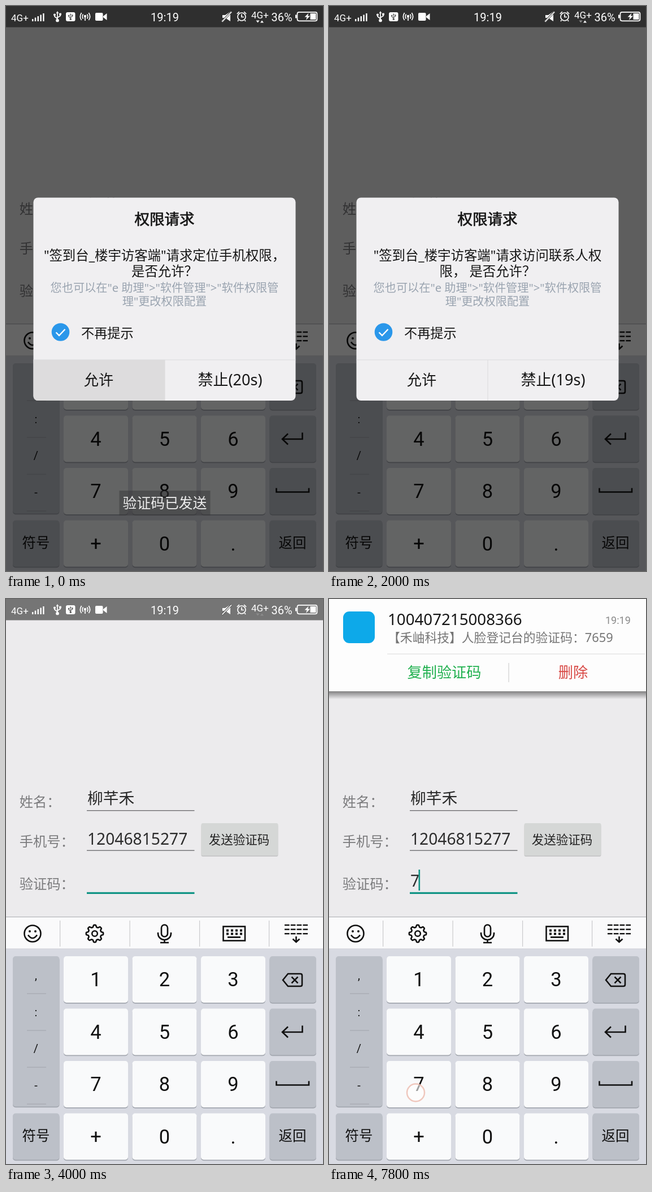
These frames come from a looping animation (561 by 998 pixels, 8000 ms). An HTML page:

```html
<!DOCTYPE html>
<html lang="zh-CN">
<head>
<meta charset="utf-8">
<title>验证码登记</title>
<style>
html, body { margin: 0; width: 100%; height: 100%; overflow: hidden; background: #ecebed; }
svg { display: block; width: 100%; height: 100%; }
text { font-family: "Noto Sans", "Noto Sans CJK SC", "Noto Sans CJK", sans-serif; white-space: pre; }
.ui { font-family: Roboto, "Noto Sans", sans-serif; }
.line { fill: none; stroke: #111; stroke-width: 2.6; }
.white { fill: none; stroke: #fff; stroke-width: 1.7; }
</style>
</head>
<body>
<svg id="stage" viewBox="0 0 561 998" preserveAspectRatio="none"></svg>
<script>
const LOOP = 8000, STEP = 200;
const stage = document.getElementById('stage');

const rect = (x, y, w, h, fill, extra = '') =>
  `<rect x="${x}" y="${y}" width="${w}" height="${h}" fill="${fill}" ${extra}/>`;
const text = (x, y, size, fill, str, extra = '') =>
  `<text x="${x}" y="${y}" font-size="${size}" fill="${fill}" ${extra}>${str}</text>`;
const mid = (x, y, size, fill, str, extra = '') =>
  text(x, y, size, fill, str, `text-anchor="middle" ${extra}`);
const path = (d, cls = 'line', extra = '') => `<path d="${d}" class="${cls}" ${extra}/>`;
const range = n => [...Array(n).keys()];
const UI = 'class="ui"';

function usb(x, y, s, color) {
  return `<g transform="translate(${x} ${y}) scale(${s})" fill="${color}" stroke="${color}" stroke-width="1.7">
    <path d="M0-7V7M0 4L-5 0V-3M0 2L5-1V-4" fill="none"/>
    <path d="M0-9.5l2.4 4h-4.8z" stroke="none"/><circle cy="7" r="2"/>
    <circle cx="-5" cy="-3" r="1.2"/><rect x="4" y="-5" width="2" height="2"/></g>`;
}

function statusIcons() {
  const cut = '#5a5a5a';
  const bars = range(5).map(i => rect(46 + i * 4.8, 23 - i * 2.5, 2.4, 4 + i * 2.5, '#fff')).join('');
  return text(9, 27, 17, '#fff', '4G+', UI) + bars +
    usb(91, 18.5, 1, '#fff') +
    rect(106, 11, 16.5, 16, '#fff', 'rx="3"') + usb(114.3, 19, .62, cut) +
    `<circle cx="140" cy="18" r="2.2" fill="#fff"/>` +
    path('M136.5 14.5q-2.6 4 0 8M143.5 14.5q2.6 4 0 8M133.6 12q-4.4 7 0 13M146.4 12q4.4 7 0 13M140 19v7', 'white') +
    rect(158, 12, 13.5, 14, '#fff', 'rx="2"') +
    path('M172 18l6.5-5v12l-6.5-5z', '', 'fill="#fff"') +
    mid(281, 26.5, 20, '#fff', '19:19', UI) +
    path('M383 16h5l9-6v17l-9-6h-5z', '', 'fill="#fff"') +
    path('M382 28L399 10', '', `stroke="${cut}" stroke-width="4"`) +
    path('M382.5 27.5L399 10.5', 'white') +
    `<circle cx="417" cy="19" r="7" class="white"/>` +
    path('M417 14.5v5h4M408.8 14l4-3.8M425.2 14l-4-3.8M411.5 25l-1.5 2M422.5 25l1.5 2', 'white') +
    text(434, 22, 17, '#fff', '4G+', UI) +
    `<path id="down" d="M442.5 25.5h6l-3 4z"/><path id="up" d="M450 29.5h6l-3-4z"/>` +
    text(469.5, 26.5, 20, '#fff', '36%', UI) +
    rect(515.5, 10.8, 35, 15.5, 'none', 'rx="3" class="white"') +
    rect(512, 15.5, 2.5, 6, '#fff') + rect(538.5, 13, 10, 11, '#fff') +
    path('M535.5 12.5l-7 7h4l-1.5 5.5 7-7.5h-4z', '', 'fill="#fff"');
}

function form() {
  const label = (y, s) => text(23.7, y, 24.3, '#7b7b7d', s);
  const underline = y => rect(143, y, 190.5, 1.4, '#6f6f72');
  return label(366.5, '姓名：') + label(437, '手机号：') + label(512, '验证码：') +
    text(144, 362, 27.8, '#282828', '柳芊禾') + underline(373) +
    text(144, 434, 28.2, '#2c2c2c', '12046815277') + underline(443.5) +
    rect(345.5, 398, 136, 57, '#b9babb', 'rx="3" opacity=".7"') +
    rect(345.5, 396, 136, 57, '#d5d7d6', 'rx="3"') +
    mid(412.5, 433, 21.5, '#222', '发送验证码') +
    rect(143, 517.8, 190.5, 3.2, '#119485') +
    text(144, 508, 28.2, '#2c2c2c', '7', 'id="code"') +
    rect(145, 478, 2.6, 37, '#119485', 'id="caret"');
}

function toolbar() {
  const gear = range(97).map(i => {
    const a = i / 96 * Math.PI * 2, r = 13.4 + 1.8 * Math.tanh(2.4 * Math.cos(8 * a));
    return `${(157 + r * Math.cos(a)).toFixed(1)} ${(591 + r * Math.sin(a)).toFixed(1)}`;
  }).join('L');
  const keys = range(8).map(i =>
    rect(390 + i % 4 * 8, 583.5 + (i >> 2) * 6, 4, 4, '#111')).join('');
  const dashes = range(12).map(i =>
    rect(493 + i % 4 * 10.8, 574.8 + (i >> 2) * 7.6, 8.6, 2.4, '#111')).join('');
  return rect(0, 561, 561, 58, '#fafafb') + rect(0, 561, 561, 1.2, '#b4b5b9') +
    rect(0, 617.5, 561, 1.2, '#c6c8cf') +
    [95, 218.5, 342, 465].map(x => rect(x, 568, 1.2, 46, '#c9c9cc')).join('') +
    `<circle cx="47" cy="591" r="14.5" class="line"/>
     <circle cx="42" cy="587" r="2" fill="#111"/><circle cx="52" cy="587" r="2" fill="#111"/>` +
    path('M39 593.5q8 11 16 0') + path(`M${gear}Z`) +
    `<circle cx="157" cy="591" r="4.8" class="line"/>` +
    rect(275, 575.5, 11, 21, 'none', 'rx="5.5" class="line"') +
    path('M269 589v2a11.5 11 0 0 0 23 0v-2M280.5 602v5M273 607h15') +
    rect(384.5, 578.5, 38.5, 25, 'none', 'class="line"') + keys +
    rect(392, 596, 23, 2.8, '#111') + dashes +
    path('M513.5 596v10M507.5 600.5l6 5.5 6-5.5');
}

function keypad() {
  const cols = [102, 223.5, 345], rows = [631, 723.5, 816, 908.5];
  const key = (x, y, w, h, fill) =>
    rect(x, y + 1.8, w, h, '#a3a7af', 'rx="5"') + rect(x, y, w, h, fill, 'rx="5"');
  const gray = (x, y, h = 82) => key(x, y, 82.5, h, '#bcc0c8');
  const digits = [...'123456789+0.'].map((c, i) => {
    const x = cols[i % 3], y = rows[Math.floor(i / 3)];
    return key(x, y, 114, 82, '#f9fafb') + mid(x + 57, y + 53.3, 34.5, '#111', c, UI);
  }).join('');
  const marks = [...',:/-'].map((c, i) =>
    mid(53, 672 + i * 64.5, 20, '#111', c, UI) +
    rect(37, 696.5 + i * 65, 34, 1.2, '#a5a9b1')).join('');
  return rect(0, 618.5, 561, 380, '#d8dae2') + digits +
    gray(12, 631, 265.5) + marks + rows.map(y => gray(466.5, y)).join('') + gray(12, 908.5) +
    mid(53, 957, 24.5, '#111', '符号') + mid(507, 957, 24.5, '#111', '返回') +
    path('M490 673l9-11h22q3 0 3 3v16q0 3-3 3h-22zM505.5 667.5l11 11M516.5 667.5l-11 11') +
    path('M524.5 753.5v11.5h-35M499 755.5l-10 9.5 10 9.5') +
    path('M478.5 851.500v7h57.500v-7');
}

function dialog() {
  const c = 280.5, ink = '#161616', hint = '#9aa4b0';
  return rect(48.5, 338.5, 464, 358.5, '#f0eff1', 'rx="8"') +
    `<path id="press" d="M48.5 625H281V697H56.5a8 8 0 0 1-8-8z" fill="#dddcdd"/>` +
    rect(48.5, 624.5, 464, 1, '#dcdcde') + rect(280.5, 625, 1, 72, '#dcdcde') +
    mid(c, 385.5, 26.5, ink, '权限请求', `stroke="${ink}" stroke-width=".7"`) +
    mid(c, 449, 23.4, ink, '', 'id="ask1"') + mid(c, 477, 23.4, ink, '', 'id="ask2"') +
    mid(c, 504.5, 20.2, hint, '您也可以在"e 助理">"软件管理">"软件权限管') +
    mid(c, 528.5, 20.2, hint, '理"更改权限配置') +
    `<circle cx="96.5" cy="576" r="15.8" fill="#2a97ea"/>` +
    path('M88.5 576.5l5.5 5.5 10.5-11', 'white', 'style="stroke-width:2.4"') +
    text(133, 585.5, 23.2, ink, '不再提示') +
    mid(164, 670, 26.2, ink, '允许') + mid(396.5, 670, 27, ink, '', 'id="deny"');
}

function notice() {
  return `<linearGradient id="shade" x2="0" y2="1"><stop stop-opacity=".45"/>
      <stop offset="1" stop-opacity="0"/></linearGradient>` +
    rect(0, 163, 561, 14, 'url(#shade)') +
    rect(0, -40, 561, 203, '#fdfdfd') +
    rect(25, 22, 56, 56, '#0da9e9', 'rx="11"') +
    text(104, 45.5, 27.7, '#161616', '100407215008366') +
    text(489, 44, 18, '#8a8a8a', '19:19', UI) +
    text(104, 75.5, 21.8, '#757575', '【禾岫科技】人脸登记台的验证码：7659') +
    rect(103, 96.5, 456, 1.2, '#e2e2e2') + rect(317.5, 113, 1.2, 34, '#cfcfcf') +
    mid(204, 139, 26.2, '#22b150', '复制验证码') + mid(432, 139, 26.2, '#d84a46', '删除');
}

stage.innerHTML = rect(0, 0, 561, 998, '#ecebed') + rect(0, 0, 561, 37.5, '#757575') +
  form() + toolbar() + keypad() +
  rect(0, 0, 561, 998, '#000', 'id="dim"') + statusIcons() +
  `<g id="dialog">${dialog()}</g>
   <g id="toast">${rect(200.5, 856, 161, 44, '#38383a', 'opacity=".5"')}${mid(281, 887, 24.8, '#ececec', '验证码已发送')}</g>
   <g id="notice">${notice()}</g>
   <circle id="touch" cx="153.5" cy="872" r="15.5" fill="#fff" fill-opacity=".6" stroke="#eebfb3" stroke-opacity=".85" stroke-width="2.5"/>`;

const el = {};
stage.querySelectorAll('[id]').forEach(n => el[n.id] = n);
const set = (id, name, value) => el[id].setAttribute(name, value);
const show = (id, on) => set(id, 'opacity', Number(on));
const clamp = v => Math.max(0, Math.min(1, v));

// Dialog state: [opacity, scale, dim]
function dialogState(t) {
  if (t < 200) return [1, 1, .6];
  if (t < 400) return [.5, 1, .3];
  if (t < 1000) return [0, 1, 0];
  if (t < 1200) return [.54, .866, .05];
  if (t < 2200) return [1, 1, .6];
  if (t < 2400) return [.5, 1, .3];
  return [0, 1, 0];
}

function render(now) {
  const t = Math.floor(now % LOOP / STEP) * STEP;
  const [alpha, scale, dim] = dialogState(t);
  const first = t < 1000;
  show('dialog', alpha);
  show('dim', dim);
  set('dialog', 'transform', `translate(281 517.5) scale(${scale}) translate(-281 -517.5)`);
  show('press', t < 400 || t >= 2200);
  el.ask1.textContent = '"签到台_楼宇访客端"' + (first ? '请求定位手机权限，' : '请求访问联系人权');
  el.ask2.textContent = first ? '是否允许？' : '限， 是否允许？';
  el.deny.textContent = `禁止(${t >= 2000 ? 19 : 20}s)`;
  show('toast', clamp((800 - t) / 400));

  set('down', 'fill', t < 200 ? '#fff' : '#8c8c8c');
  set('up', 'fill', t < 200 || t === 2000 ? '#fff' : '#8c8c8c');

  const slide = clamp((t - 5000) / 400);
  show('notice', slide > 0);
  set('notice', 'transform', `translate(0 ${-180 * (1 - slide) ** 2})`);

  const typed = t >= 7800, blink = t % 1000;
  show('code', typed);
  show('caret', typed || (t >= 2600 && blink >= 200 && blink < 800));
  set('caret', 'x', typed ? 158.5 : 143.5);
  show('touch', t >= 7600);
}

const start = performance.now();
function tick() {
  render(performance.now() - start);
  requestAnimationFrame(tick);
}
tick();
</script>
</body>
</html>
```
